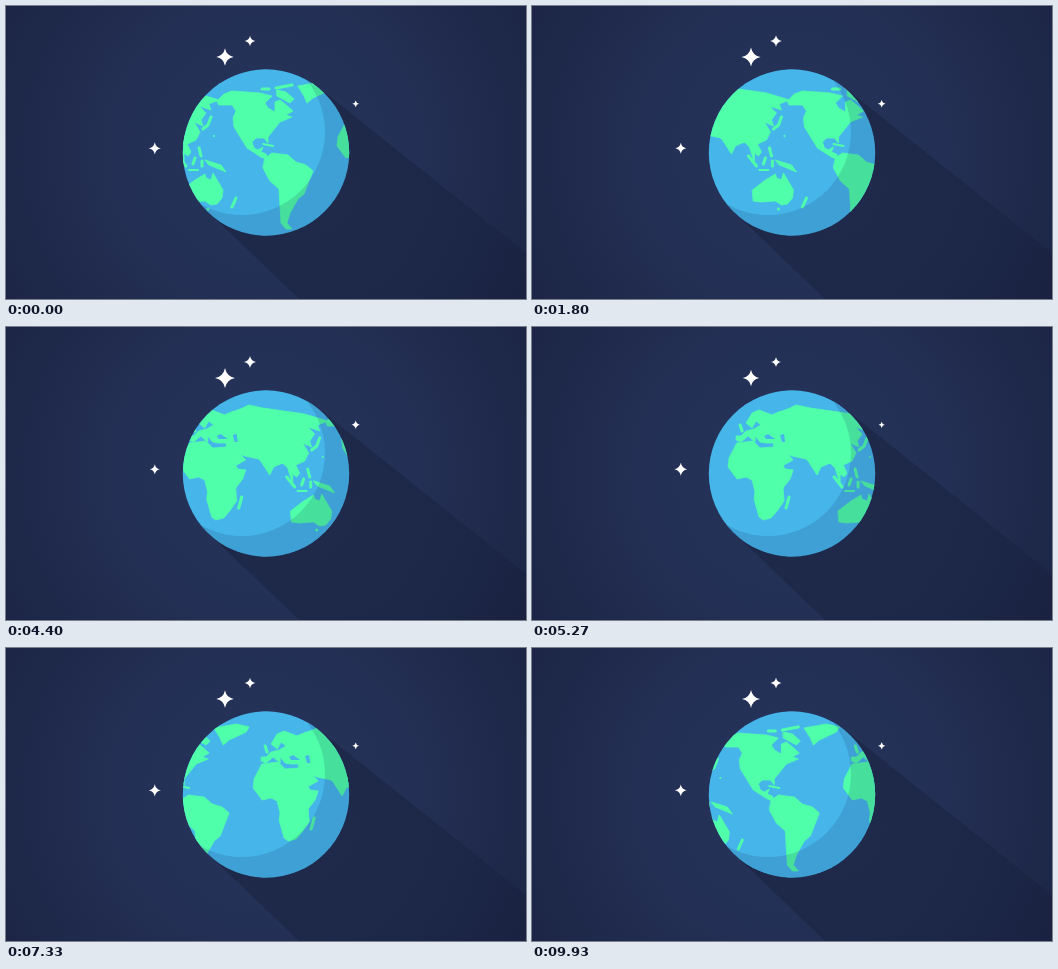
These frames come from a looping animation (520 by 293 pixels, 9990 ms). An HTML page:

```html
<!DOCTYPE html>
<html lang="en">
<head>
<meta charset="utf-8">
<title>Spinning globe</title>
<style>
  html, body { margin: 0; height: 100%; overflow: hidden; background: #222d52; }
  svg { display: block; width: 100%; height: 100%; }
  .land { fill: #50ffa9; stroke: #50ffa9; stroke-width: .8; stroke-linejoin: round; stroke-linecap: round; }
  .isle { fill: none; stroke-width: 3; }
  .sea { fill: #46b6ea; }
</style>
</head>
<body>
<svg viewBox="0 0 520 293">
  <defs>
    <radialGradient id="sky" gradientUnits="userSpaceOnUse" cx="260" cy="146" r="300">
      <stop offset="0" stop-color="#27355d"/>
      <stop offset=".5" stop-color="#232f54"/>
      <stop offset="1" stop-color="#1c2545"/>
    </radialGradient>
    <linearGradient id="cast" gradientUnits="userSpaceOnUse" x1="260" y1="146" x2="470" y2="320">
      <stop offset="0" stop-color="#10172e" stop-opacity=".34"/>
      <stop offset="1" stop-color="#10172e" stop-opacity=".22"/>
    </linearGradient>
    <clipPath id="disc"><circle cx="260" cy="146.5" r="83.2"/></clipPath>
    <mask id="crescent">
      <rect width="520" height="293" fill="#fff"/>
      <circle cx="236" cy="126" r="83"/>
    </mask>
    <path id="spark" d="M0-1Q.16-.16 1 0Q.16.16 0 1Q-.16.16-1 0Q-.16-.16 0-1Z"/>

    <g id="world">
      <g class="land">
        <path id="africa" d="M75 116L91 114 98 121 112 120 119 135 123 142 131 143 128 152 121 161 122 174 115 184 109 191 101 193 97 190 92 172 93 165 90 153 84 150 75 152 66 140 67 131Z"/>
        <path id="europe" d="M112 121V116H104L98 115 93 109V115L86 109 79 115 74 113V109H79L84 104 92 102 99 98 94 94 90 101 84 96 90 86 97 83 110 88 119 84 124 126Z"/>
        <path id="siberia" d="M110 88L128 81 134 78 148 81 190 87 213 94 203 98 205 104 193 100 200 107 195 114 197 120 188 116 194 126 190 134 181 138 163 136 130 129 112 121Z"/>
        <path id="arabia" d="M112 121L120 139 131 133 124 125Z"/>
        <path id="india" d="M140 128L146 134 155 148 159 140 168 136 173 141 178 157V147L182 150 185 146 181 138 190 132Z"/>
        <path id="australia" d="M176 184L189 174 199 168 200 172 205 174 207 167 217 184 216 192 211 198 205 199 199 195 184 196 177 195Z"/>
        <path id="north" d="M211 95L218 88 226 85 254 87 266 90 259 97 262 102 269 106V96L274 94 279 98 287 105 280 109 286 111 274 116 262 131V137L258 132H250L246 136 248 142 252 144 257 141 255 146 260 148 262 153 265 155 255 151 241 142 228 121 227 112 230 105 226 99 213 99Z"/>
        <path id="south" d="M259 152L266 147 282 149 290 156 300 159 307 165 298 188 292 193 284 207 281 217 286 223H280L275 217 273 183 264 175 257 162Z"/>
        <path id="greenland" d="M292 80L314 76 327 79 324 84 307 92 301 97 298 90Z"/>
        <path id="baffin" d="M271 84L280 86 288 93 284 97 271 90Z"/>
        <path id="guinea" d="M199 154L215 159 220 166 203 159Z"/>
        <g class="isle">
          <path d="M127 170L124 181M78 98L80 104M256 83H263M270 82L286 79"/>
          <path d="M197 123L202 119 205 111M172 150L180 160M193 142L195 150"/>
          <path d="M189 152L187 158M196 155V160M230 192L226 201M202 203H202"/>
          <path stroke-width="2" d="M183 164H192M257 138L267 140M208 130H208"/>
        </g>
      </g>
      <path class="sea" d="M102 109L106 107 113 112H104ZM118 108L122 107 123 115H120Z"/>
    </g>
  </defs>

  <rect width="520" height="293" fill="url(#sky)"/>
  <path d="M311 80L520 247V293H293L201 205Z" fill="url(#cast)"/>

  <g clip-path="url(#disc)">
    <rect class="sea" x="170" y="60" width="180" height="175"/>
    <g id="map">
      <use href="#world" x="-265"/>
      <use href="#world"/>
      <use href="#world" x="265"/>
    </g>
    <rect x="170" y="60" width="180" height="175" fill="#14285a" opacity=".15" mask="url(#crescent)"/>
  </g>
  <g id="stars" fill="#fff"></g>
</svg>
<script>
  const LOOP = 9990, SPEED = 24.7, PULSE = 2.68, PEAK = 2.33;
  const map = document.getElementById('map');
  const sky = document.getElementById('stars');

  function addStar(x, y, radius, swing) {
    const el = document.createElementNS('http://www.w3.org/2000/svg', 'use');
    el.setAttribute('href', '#spark');
    sky.append(el);
    return wave => el.setAttribute('transform',
      `translate(${x} ${y}) scale(${(radius + swing * wave).toFixed(3)})`);
  }

  const stars = [
    addStar(219, 51, 10.4, -2.6),
    addStar(244, 35, 6.2, -1.4),
    addStar(349.7, 97.8, 4.5, -1.7),
    addStar(148.8, 142.3, 4.8, 2)
  ];

  // 15 pictures a second, held for 70, 60 and 70 ms
  function stepTime(ms) {
    const rest = ms % 200;
    const step = rest < 70 ? 0 : rest < 130 ? 1 : 2;
    return Math.floor(ms / 200) / 5 + step / 15;
  }

  function draw(now) {
    const t = stepTime(now % LOOP);
    const wave = Math.cos((t - PEAK) / PULSE * 2 * Math.PI);
    map.setAttribute('transform', `translate(${(t * SPEED).toFixed(2)} 0)`);
    stars.forEach(pulse => pulse(wave));
  }

  function tick() {
    draw(performance.now());
    requestAnimationFrame(tick);
  }
  tick();
</script>
</body>
</html>
```
